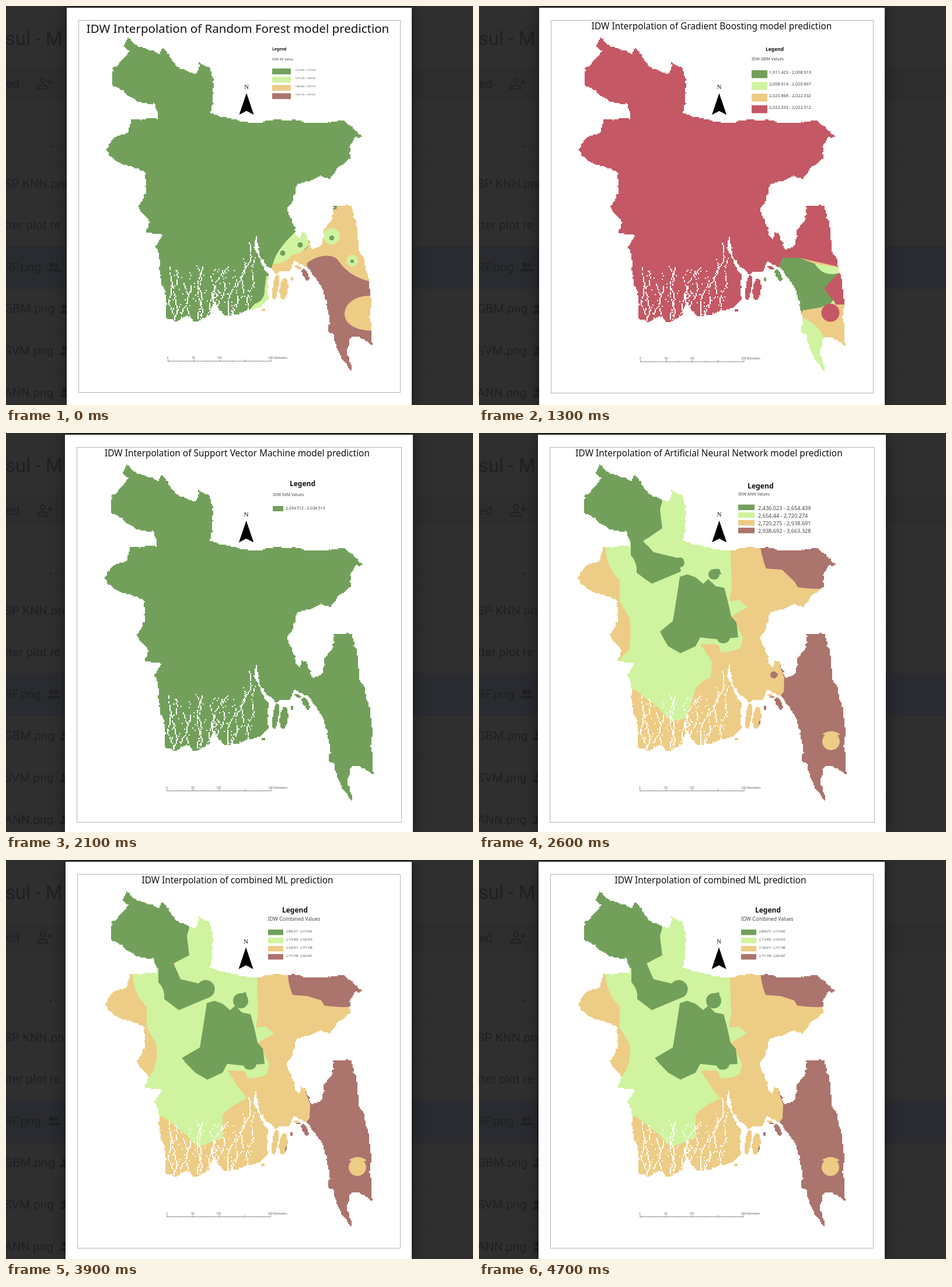
These frames come from a looping animation (800 by 683 pixels, 4800 ms). An HTML page with a canvas:

```html
<!DOCTYPE html>
<html lang="en">
<head>
<meta charset="utf-8">
<title>Model prediction maps</title>
<style>
html, body { margin: 0; width: 100%; height: 100%; overflow: hidden; background: #2f2f2f; }
canvas { display: block; width: 800px; height: 683px; }
</style>
</head>
<body>
<canvas id="stage" width="800" height="683"></canvas>
<script>
const W = 800, H = 683, LOOP = 4800, CELL = 2;
const GREEN = '#72a05b', LIME = '#d0f39f', TAN = '#edcc85', BROWN = '#ab746d', RED = '#c45865';
const SANS = '"Noto Sans", "Open Sans", sans-serif';
const INK = '#1f2021';

let seed = 11;
function rnd() {
  seed = (seed * 16807) % 2147483647;
  return seed / 2147483647;
}
const spread = r => (rnd() * 2 - 1) * r;

function surface(w, h) {
  const c = document.createElement('canvas');
  c.width = w;
  c.height = h;
  return c.getContext('2d', { willReadFrequently: w < W });
}

// Key points of the border, clockwise; roughen() adds the small detail
const northEast = `208,54 220,66 238,73 262,82 268,70 280,84 296,106 322,117 331,110 330,95 341,104 349,104
  355,126 355,150 350,184 384,192 408,199 450,196 490,194 525,201 575,196 592,206 612,223 597,225 589,240
  590,262 566,280 555,297 540,291 522,300 498,306 490,335 482,348 494,376 502,402 506,386 512,388 524,416
  540,410 545,383 558,366 561,342 579,342 592,342 601,378 604,418 612,430 622,475 626,513 626,560 629,581`;
const southWest = `604,566 590,569 584,591 597,633 572,597 561,562 552,556 554,530 543,483 518,448 494,437
  485,453 462,459 447,445 434,428 428,390 425,416 450,461 450,500 432,516 395,528 375,530 356,505 350,528
  322,540 310,528 294,541 274,533 275,502 264,455 262,425 256,412 267,391 240,388 246,370 226,343 240,318
  239,285 215,275 188,265 171,246 187,224 210,217 214,194 262,193 255,168 228,164 203,148 181,134 184,106
  213,78 202,68`;

function roughen(c, [ax, ay], [bx, by]) {
  const dx = bx - ax, dy = by - ay, len = Math.hypot(dx, dy);
  if (len < 6) {
    c.lineTo(ax + spread(1.2), ay + spread(1.2));
    return;
  }
  const bend = spread(Math.min(.08, 2 / len));
  const mid = [ax + dx / 2 - dy * bend, ay + dy / 2 + dx * bend];
  roughen(c, [ax, ay], mid);
  roughen(c, mid, [bx, by]);
}

function border(c) {
  const pts = `${northEast} ${southWest}`.split(/\s+/).map(p => p.split(',').map(Number));
  c.beginPath();
  pts.forEach((p, i) => roughen(c, p, pts[(i + 1) % pts.length]));
  c.fill();
}

function island(c, x, y, rx, ry, tilt = 0) {
  c.beginPath();
  c.ellipse(x, y, rx, ry, tilt, 0, 7);
  c.fill();
}

function gap(c, x, y) {
  c.clearRect(Math.floor(x / CELL) * CELL, Math.floor(y / CELL) * CELL, CELL, CELL);
}

// Rivers wander south through the delta, the eastern ones start higher and lean west
function rivers(c) {
  for (let i = 0; i < 14; i++) {
    const east = i > 10;
    let x = 282 + i * 11.3;
    for (let y = (east ? 405 : 445) + rnd() * 35; y < 542; y += CELL) {
      x += Math.sin(y / 9 + i * 2) * .9 + spread(.9) - (i > 7 ? .4 : 0);
      if (rnd() < .8) gap(c, x, y);
    }
  }
  for (let i = 0; i < 90; i++) gap(c, 280 + rnd() * 145, 450 + rnd() * 80);
}

function landMask() {
  const c = surface(W / CELL, Math.ceil(H / CELL)), { width, height } = c.canvas;
  c.scale(1 / CELL, 1 / CELL);
  border(c);
  island(c, 462, 481, 5, 22, .15);
  island(c, 476, 484, 7, 19, .1);
  island(c, 513, 460, 4.5, 11, -.5);
  island(c, 490, 467, 2, 3);
  island(c, 500, 447, 6, 3, .5);
  island(c, 441, 520, 4, 3);
  rivers(c);
  const img = c.getImageData(0, 0, width, height);
  for (let i = 3; i < img.data.length; i += 4) img.data[i] = img.data[i] < 128 ? 0 : 255;
  c.putImageData(img, 0, 0);
  return c.canvas;
}
const land = landMask();

const all = 'M0,0H800V683H0Z';
const disc = (x, y, r) => `M${x - r},${y}a${r},${r} 0 1,0 ${2 * r},0a${r},${r} 0 1,0 ${-2 * r},0Z`;

const forest = [
  [GREEN, all],
  [LIME, 'M457,443C462,420 480,402 498,384H516L519,408L500,430L470,446ZM446,462H460V510L425,535L413,525L426,510Q444,504 443,485Z'],
  [TAN, 'M457,442Q482,440 490,426Q515,422 518,408L540,348H566L570,330H645V645H500L446,560L432,527L449,509L451,458Z'],
  [BROWN, 'M516,440C530,428 555,422 568,434C580,452 595,464 622,471H640V645H500V472L503,449H515Z'],
  [TAN, 'M630,496H622C598,496 580,510 580,527C580,545 600,556 630,556Z'],
  [LIME, disc(558, 394, 14) + disc(593, 436, 10)],
  [GREEN, disc(474, 423, 4.5) + disc(504, 409, 4.5) + disc(558, 397, 4.3) + disc(593, 437, 3) + disc(561, 343, 4)]
];

const boosting = [
  [RED, all],
  [TAN, 'M548,430L619,446V448L575,441ZM545,521L590,510H640V600H588L545,532Z'],
  [GREEN, 'M516,440L520,430H548L575,440L616,456L591,482L608,505L585,515L555,520L551,528H545L500,474H487V464L504,449H512Z'],
  [LIME, 'M575,440L618,447V456Q590,464 575,440ZM585,515Q604,510 607,502L611,510ZM545,530Q578,538 592,568L602,645H540Z'],
  [RED, disc(602, 524, 15.5)]
];

// Shared patchwork; k runs from the neural network (0) to the combined map (1)
function mosaic(k) {
  const mix = (a, b) => a + (b - a) * k;
  const ne = mix(262, 248), knob = mix(8, 15.5), drop = mix(9, 13);
  return [
    [TAN, all],
    [LIME, `M205,185L219,196Q220,228 243,250V285L260,315Q264,348 ${mix(258, 246)},370L236,390L245,432L272,438L308,467L330,490
      L${mix(356, 372)},${mix(484, 473)}L372,435Q382,421 ${mix(398, 414)},${mix(415, 406)}L400,388L380,358L395,359
      Q412,354 414,372Q440,371 448,364L452,347L432,312L460,296L446,284L429,286L433,262L430,180L360,80H300L290,180Z`],
    [GREEN, `M160,40H290L315,116L311,130L315,162L${mix(283, 288)},${mix(184, 176)}L300,203L342,213L347,235L297,256L272,237
      Q274,221 262,208V184L160,180Z`],
    [GREEN, `M345,244L358,240L372,245L385,256L394,248L405,260L420,263L426,285L432,312L441,322L444,347L430,348
      Q428,357 418,357Q410,357 408,350L380,347L372,362L346,374L325,362L${mix(311, 302)},338L333,320Q339,285 345,244Z`],
    [GREEN, disc(347 - knob / 4, 220, knob)],
    [GREEN, disc(403, 240, drop)],
    [GREEN, `M${403 - drop},240Q398,228 412,${mix(231, 225)}L415,240Z`],
    [BROWN, `M${mix(481, 484)},185Q482,205 492,230L518,232L540,${ne - 9}L545,${ne}Q570,${ne + 4} 600,${ne + 2}L645,190Z`],
    [BROWN, 'M514,395L522,416L521,440L515,447L500,448L488,456V475L479,492V500H500L540,645H645V330H540V395Z'],
    [BROWN, disc(505, 411, mix(6, 0))],
    [TAN, disc(602, 524, 15)],
    [TAN, 'M587,512Q602,501 618,512L607,516Z']
  ];
}

const wide = { page: [101, 697], frame: [121, 678, 666] };

// head: x, baseline, size. sub: text, baseline, size. key: x, y, width, height, pitch. label: x, baseline, size.
const slides = [
  { at: 0, name: 'Random Forest model', size: 20.5, mid: 397, base: 46,
    page: [104, 695], frame: [124, 676, 661], regions: forest,
    head: [456, 76, 6.7], sub: ['IDW RF Value', 93, 5.75], key: [456, 107, 32, 10, 14.1], label: [495, 111, 3.6],
    colors: [GREEN, LIME, TAN, BROWN], breaks: [1973.404, 1975.623, 1984.341, 1995.193, 1997.621] },
  { at: 1300, name: 'Gradient Boosting model', mid: 398.5,
    page: [103, 695], frame: [123, 676, 662], regions: boosting,
    head: [491, 77, 8.5], sub: ['IDW GBM Values', 93, 7], key: [467, 110, 27, 13.5, 20], label: [497, 115.5, 7.25],
    colors: [GREEN, LIME, TAN, RED], breaks: [1911.423, 2008.913, 2020.867, 2022.332, 2022.512] },
  { at: 2000, name: 'Support Vector Machine model', mid: 396,
    ...wide, regions: [[GREEN, all]],
    head: [486, 91, 12], sub: ['IDW SVM Values', 108, 7], key: [457, 125, 18, 9, 14], label: [479, 131, 6.8],
    colors: [GREEN], breaks: [2034.512, 2034.513] },
  { at: 2600, name: 'Artificial Neural Network model', mid: 394,
    ...wide, regions: mosaic(0),
    head: [460, 95, 12.2], sub: ['IDW ANN Values', 107, 7], key: [444, 122.5, 28, 9.5, 13.2], label: [478, 131.5, 9.15],
    colors: [GREEN, LIME, TAN, BROWN], breaks: [2436.023, 2654.439, 2720.274, 2938.691, 3663.328] },
  { at: 3300, name: 'K-Nearest Neighbors\u00a0 model', mid: 397,
    ...wide, regions: [[GREEN, all]],
    head: [486, 91, 12], sub: ['IDW KNN Values', 108, 7], key: [457, 125, 18, 9, 14], label: [479, 131, 6.8],
    colors: [GREEN], breaks: [1880.949, 1880.948] },
  { at: 3900, name: 'combined ML', mid: 396.5,
    page: [102, 695], frame: [122, 676, 664], regions: mosaic(1),
    head: [473, 89.5, 12], sub: ['IDW Combined Values', 104, 8.6], key: [449, 119, 26, 9.5, 14], label: [480, 123.7, 4.5],
    colors: [GREEN, LIME, TAN, BROWN], breaks: [2068.271, 2113.402, 2126.016, 2171.748, 2320.467] }
];

function write(c, text, x, y, size, color = '#111', font = SANS, weight = 400) {
  c.font = `${weight} ${size}px ${font}`;
  c.fillStyle = color;
  c.fillText(text, x, y);
}

function centred(c, ...args) {
  c.textAlign = 'center';
  write(c, ...args);
  c.textAlign = 'left';
}

function box(c, color, x, y, w, h) {
  c.fillStyle = color;
  c.fillRect(x, y, w, h);
}

function people(c, x, y) {
  c.fillStyle = INK;
  for (const [dx, r] of [[8, 4], [16, 3.5]]) {
    c.beginPath();
    c.arc(x + dx, y - 4, r, 0, 7);
    c.fill();
    c.beginPath();
    c.ellipse(x + dx, y + 7, r + 4, 5, 0, Math.PI, 0);
    c.fill();
  }
}

function backdrop(c) {
  const font = 'Roboto, sans-serif', row = 71.6;
  box(c, '#2f2f2f', 0, 0, W, H);
  box(c, '#2d2d2e', 0, 107, W, 51);
  box(c, '#292b30', 0, 412, W, 71);
  box(c, '#2a2a2a', 0, 239, W, 1);
  for (let y = 268; y < H; y += row) box(c, '#2a2a2a', 0, y, W, 1);
  write(c, 'sul - M', -1, 67, 33, INK, font);
  write(c, 'ed', 0, 140, 21, INK, font);
  c.strokeStyle = INK;
  c.lineWidth = 2;
  c.stroke(new Path2D(disc(63, 127, 4) + 'M54,142C54,133 72,133 72,142ZM71,130H80M75.5,125.5V134.5'));
  box(c, INK, 75, 240, 3, 3);
  ['SP KNN', 'tter plot re', 'RF', 'GBM', 'SVM', 'ANN'].forEach((s, i) => {
    write(c, i === 1 ? s : s + '.png', -3, 310.5 + i * row, 21, INK, font);
    if (i > 1) people(c, i === 2 ? 70 : 92, 304 + i * row);
  });
}

function drawMap(regions) {
  const c = surface(W, H);
  for (const [color, d] of regions) {
    c.fillStyle = color;
    c.fill(new Path2D(d));
  }
  c.globalCompositeOperation = 'destination-in';
  c.imageSmoothingEnabled = false;
  c.drawImage(land, 0, 0, land.width * CELL, land.height * CELL);
  return c.canvas;
}

function northArrow(c) {
  centred(c, 'N', 412, 142, 11, '#111', '"Liberation Serif", serif');
  c.fillStyle = '#000';
  c.fill(new Path2D('M412,149L424.5,186L412,179.5L399.5,186Z'));
}

function scaleBar(c) {
  const x = 277, y = 608, step = 22.1;
  box(c, '#888', x, y - .5, step * 8, 1);
  for (let i = 0; i <= 8; i++) box(c, '#888', x + i * step, y - (i % 2 ? 1 : 3), 1, i % 2 ? 1.5 : 3.5);
  ['0', '50', '100'].forEach((t, i) => centred(c, t, x + i * step * 2, y - 4, 4.6, '#555'));
  write(c, '200 Kilometers', x + step * 8 - 4, y - 4, 4.6, '#555');
}

function legend(c, { head, sub, key, label, colors, breaks }) {
  const [x, y, w, h, pitch] = key, [tx, ty, size] = label;
  const show = v => v.toLocaleString('en-US', { maximumFractionDigits: 3 });
  write(c, 'Legend', ...head, '#111', SANS, 700);
  write(c, sub[0], x, sub[1], sub[2], '#444');
  colors.forEach((color, i) => {
    const low = breaks[i] + (i ? .001 : 0);
    box(c, color, x, y + i * pitch, w, h);
    write(c, `${show(low)} - ${show(breaks[i + 1])}`, tx, ty + i * pitch, size, '#444');
  });
}

function render(s) {
  const c = surface(W, H);
  const [l, r] = s.page, [x0, x1, y1] = s.frame;
  backdrop(c);
  c.shadowColor = 'rgba(0,0,0,.45)';
  c.shadowBlur = 22;
  box(c, '#fff', l, 3, r - l, H);
  c.shadowColor = 'transparent';
  c.strokeStyle = '#b4b4b8';
  c.lineWidth = 1;
  c.strokeRect(x0 + .5, 24.5, x1 - x0 - 1, y1 - 24);
  centred(c, `IDW Interpolation of ${s.name} prediction`, s.mid, s.base || 40, s.size || 15.42);
  legend(c, s);

  // The map grows with its frame
  c.save();
  c.translate(x0, 24);
  c.scale((x1 - x0) / 552, (y1 - 24) / 637);
  c.translate(-124, -24);
  c.imageSmoothingEnabled = false;
  c.drawImage(drawMap(s.regions), 0, 0);
  northArrow(c);
  scaleBar(c);
  c.restore();
  return c.canvas;
}

const shots = slides.map(s => ({ at: s.at, image: render(s) }));
const stage = document.getElementById('stage').getContext('2d');
const start = performance.now();

function tick() {
  const t = Math.max(0, performance.now() - start) % LOOP;
  stage.drawImage(shots.filter(s => s.at <= t).pop().image, 0, 0);
  requestAnimationFrame(tick);
}
tick();
</script>
</body>
</html>
```
